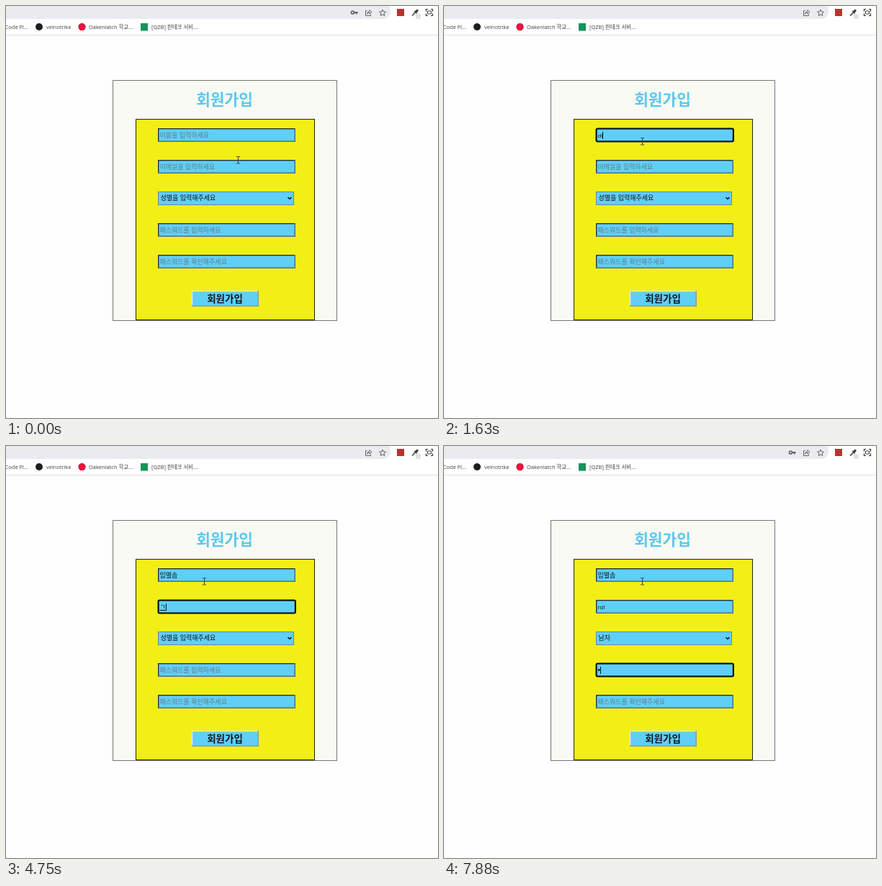
These frames come from a looping animation (600 px wide and 573 px high, 8000 ms). An HTML page with a canvas:

```html
<!DOCTYPE html>
<html lang="ko">
<head>
<meta charset="utf-8">
<title>회원가입</title>
<style>
html, body { margin: 0; width: 100%; height: 100%; overflow: hidden; background: #fefdff; }
canvas { display: block; width: 600px; height: 573px; }
</style>
</head>
<body>
<canvas id="stage" width="600" height="573"></canvas>
<script>
const ctx = document.getElementById('stage').getContext('2d');
const LOOP = 8000;
const FONT = '"Open Sans", "Noto Sans CJK KR", "Noto Sans CJK JP", sans-serif';
const BLUE = '#60cff8';
const INK = '#5f6368';

const fields = [
  { y: 170, hint: '이름을 입력하세요' },
  { y: 214, hint: '이메일을 입력하세요' },
  { y: 258, hint: '성별을 입력해주세요', select: true },
  { y: 302, hint: '패스워드를 입력하세요', secret: true },
  { y: 346, hint: '패스워드를 확인해주세요' }
];

// time, focused field, its value, caret shown, last syllable still composing
const events = [
  [750, 0, '', true],
  [1000, 0, 'd', true],
  [1380, 0, 'd', false],
  [1630, 0, 'dl', true],
  [1750, 0, 'd', true],
  [1880, 0, '', true],
  [2130, 0, 'ㅇ', true, true],
  [2250, 0, '이', true, true],
  [2380, 0, '임', true, true],
  [2500, 0, '임벼', true, true],
  [2630, 0, '임별', true, true],
  [2750, 0, '임별소', true, true],
  [2880, 0, '임별솜', true, true],
  [3000, 1, '', true],
  [3500, 1, '', false],
  [4000, 1, '', true],
  [4380, 1, '', false],
  [4750, 1, 'ㄱ', true, true],
  [4880, 1, '', true],
  [5250, 1, 'r', true],
  [5380, 1, 'rd', true],
  [5630, 1, 'rdl', true],
  [6130, 1, 'rdl', false],
  [6630, 2, '', false],
  [7130, 2, '남자', false],
  [7500, 3, '', true],
  [7880, 3, '*', true]
];

function rect(x, y, w, h, color) {
  ctx.fillStyle = color;
  ctx.fillRect(x, y, w, h);
}

function frame(x, y, w, h, color) {
  ctx.strokeStyle = color;
  ctx.lineWidth = 1;
  ctx.strokeRect(x + 0.5, y + 0.5, w - 1, h - 1);
}

function dot(x, y, r, color) {
  ctx.fillStyle = color;
  ctx.beginPath();
  ctx.arc(x, y, r, 0, Math.PI * 2);
  ctx.fill();
}

function line(path, color = INK, width = 1) {
  ctx.strokeStyle = color;
  ctx.lineWidth = width;
  ctx.stroke(new Path2D(path));
}

function text(str, x, y, size, color, weight = 400, align = 'left') {
  ctx.font = `${weight} ${size}px ${FONT}`;
  ctx.textAlign = align;
  ctx.fillStyle = color;
  ctx.fillText(str, x, y);
}

function bevel(x, y, w, h, light, dark, size) {
  rect(x, y, w, h, dark);
  rect(x, y, w - size, size, light);
  rect(x, y, size, h - size, light);
  rect(x + size, y + size, w - 2 * size, h - 2 * size, BLUE);
}

function drawToolbar(showKey) {
  rect(0, 0, 600, 40, '#ffffff');
  ctx.fillStyle = '#e9ebee';
  ctx.beginPath();
  ctx.roundRect(-20, -4, 554, 22, 10);
  ctx.fill();
  rect(0, 40, 600, 1, '#dddee2');

  if (showKey) {
    ctx.strokeStyle = INK;
    ctx.lineWidth = 1.7;
    ctx.beginPath();
    ctx.arc(481.5, 9, 2, 0, Math.PI * 2);
    ctx.stroke();
    line('M483.5 9H488.5M486.8 9V11.5', INK, 1.8);
  }
  line('M501.5 6.5H499.5V13.5H506.5V11.5M501.5 11Q502 7.5 505 7.5V5.5L508 8.4L505 11V9.2Q503 9.2 501.5 11');
  line('M523 5L524.3 7.9L527.5 8.2L525.1 10.3L525.8 13.4L523 11.8L520.2 13.4L520.9 10.3L518.5 8.2L521.7 7.9Z');
  rect(543, 4, 10, 10, '#b8332d');
  line('M564 13.5L569 8.5', INK, 1.8);
  line('M567.2 6.7L570.8 10.3', '#333', 1.6);
  line('M569.5 8L572 5.5', '#333', 3);
  rect(569, 11, 7, 7, '#e2e3e6');
  line('M583.5 7.5V4.5H586M590 4.5H592.5V7.5M592.5 10.5V13.5H590M586 13.5H583.5V10.5', '#333', 1.2);
  line('M585.5 7H590.5V11H585.5Z', '#444');

  const label = (str, x, align) => text(str, x, 31.7, 7.5, '#3c4043', 400, align);
  label('Code Pl...', 31, 'right');
  dot(46, 29, 5, '#1b1f23');
  label('velnotrike', 56);
  dot(105.5, 29, 5.2, '#e3173e');
  label('Oakenlatch 학교...', 115);
  rect(187, 24, 10, 10.5, '#15945a');
  label('[QZB] 핀테크 서비...', 202);
}

function drawCard() {
  rect(148, 103, 312, 335, '#f9faf3');
  frame(148, 103, 312, 335, '#777777');
  text('회원가입', 303.5, 138, 21.4, '#5ac8ee', 700, 'center');
  rect(180, 157, 249, 280, '#f2ef16');
  frame(180, 157, 249, 280, '#25250c');
  bevel(258, 396, 93, 22, '#e9eef2', '#8c9aa3', 1.5);
  text('회원가입', 304, 411.6, 13.5, '#12171c', 700, 'center');
}

function drawField(field, value, focus) {
  const { y } = field;
  const w = field.select ? 189 : 191;
  if (field.select) {
    rect(211, y, w, 19, BLUE);
    frame(211, y, w, 19, '#70838c');
    line(`M391.5 ${y + 8}L394 ${y + 10.5}L396.5 ${y + 8}`, '#101010', 1.5);
  } else {
    bevel(211, y, w, 19, '#26323a', '#54707e', 1.5);
  }
  if (focus) {
    ctx.strokeStyle = '#08101a';
    ctx.lineWidth = 2;
    ctx.beginPath();
    ctx.roundRect(211.5, y + 0.5, w - 0.5, 18, 2);
    ctx.stroke();
  }

  const left = field.select ? 214.5 : 213.5;
  const base = y + (field.select ? 12 : 12.7);
  const size = /[a-z]/.test(value) ? 8 : 9;
  const hintColor = field.select ? '#111' : '#68777e';
  if (field.secret && value) dot(215.2, y + 9.5, 1.4, '#111');
  else text(value || field.hint, left, base, size, value ? '#111' : hintColor);
  if (!focus) return;

  const end = field.secret && value ? 217 : left + (value && ctx.measureText(value).width);
  if (focus.composing) {
    const start = left + ctx.measureText(value.slice(0, -1)).width;
    rect(start, y + 14, end - start, 1, '#111');
  }
  if (focus.caret) rect(Math.round(end), y + 5, 1, 10, '#111');
}

function drawPointer(t) {
  const p = Math.min(Math.floor(t / 125) / 6, 1);
  const ease = p * p * (3 - 2 * p);
  ctx.save();
  ctx.translate(Math.round(322 - 47 * ease) + 0.5, Math.round(214 - 26 * ease));
  line('M-2.5 -4.5H-0.7L0 -4L0.7 -4.5H2.5M0 -4V4.5M-2.5 5H-0.7L0 4.5L0.7 5H2.5', '#333a3d');
  ctx.restore();
}

function render(t) {
  const past = events.filter(e => e[0] <= t);
  const now = past[past.length - 1];
  rect(0, 0, 600, 573, '#fefdff');
  drawToolbar(t < 1000 || t >= 7880);
  drawCard();
  fields.forEach((field, i) => {
    const own = past.filter(e => e[1] === i).pop();
    const focus = now && now[1] === i && { caret: now[3], composing: now[4] };
    drawField(field, own ? own[2] : '', focus);
  });
  drawPointer(t);
}

const start = performance.now();
function tick() {
  render((performance.now() - start) % LOOP);
  requestAnimationFrame(tick);
}
tick();
</script>
</body>
</html>
```
